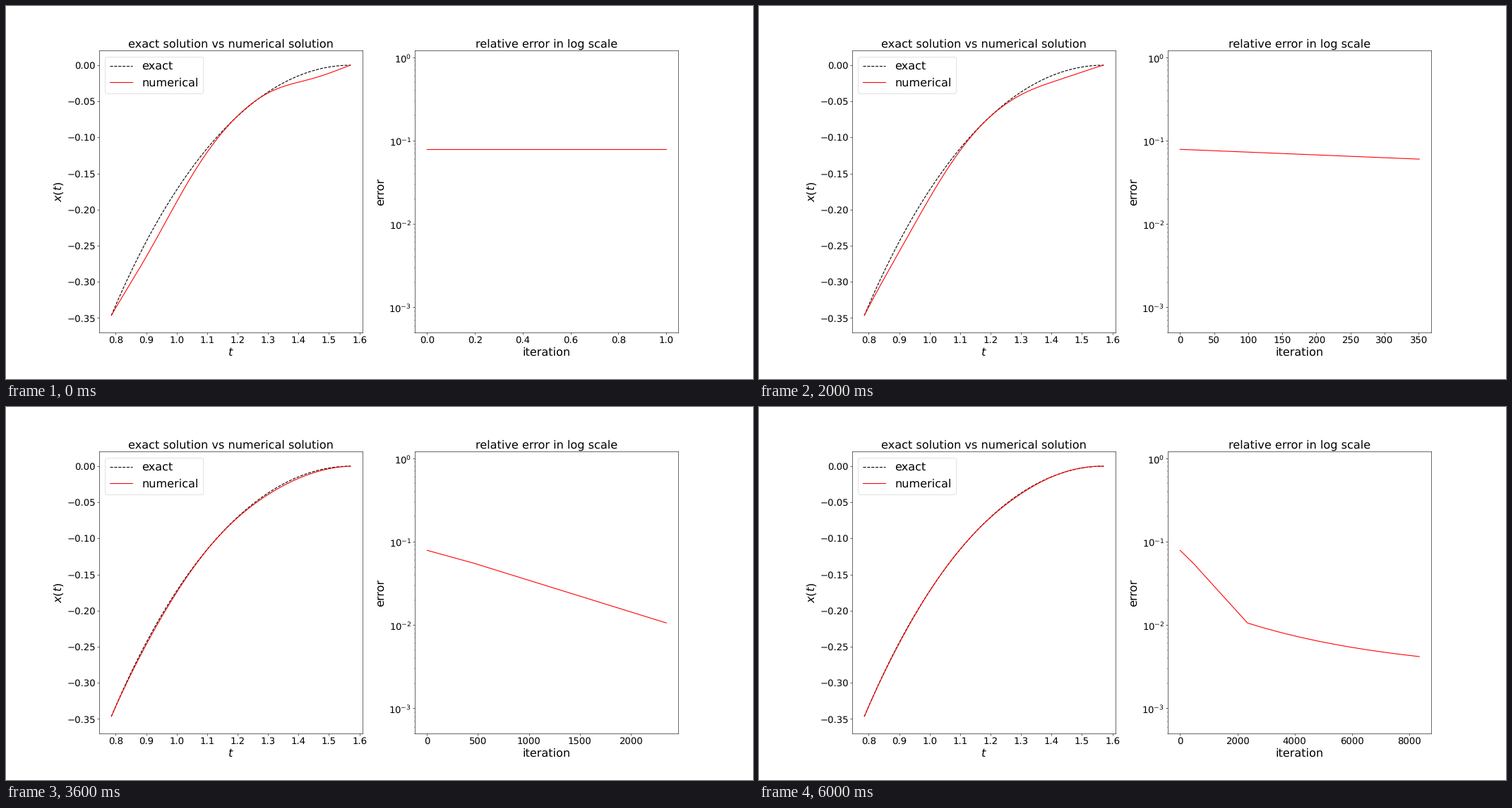
Animation of 1058x529 px, one loop 6.4 s. Source, as a matplotlib script:

```python
import math
import numpy as np
import matplotlib.pyplot as plt
from matplotlib.animation import FuncAnimation

DPI = 52.9
FRAMES = 16
LABEL, TICK = 22, 18
KINK = 2351  # convergence slows down from this iteration on
plt.rcParams.update({"font.family": "DejaVu Sans", "text.hinting": "none"})

t = np.linspace(np.pi / 4, np.pi / 2, 400)
s = (t - t[0]) / (t[-1] - t[0])
exact = np.log(np.sin(t))

# Sine modes of the deviation: (start amplitude, decay rate).
MODES = [(0.0092, 0.00066), (0.0058, 0.0028), (0.0106, 0.00087),
         (0.0006, 0), (0.0018, 0.0023)]


def stride(n):
    """Iterations between two snapshots; grows as the descent goes on."""
    limits = {50: 25, 350: 100, 550: 200, 1350: 400, math.inf: 1000}
    return next(size for limit, size in limits.items() if n < limit)


def iterations(frame):
    n = 1
    for _ in range(frame):
        n += stride(n)
    return n


def error(n):
    fast = np.minimum(n, KINK)
    late = np.maximum(n - KINK, 0)
    log_error = -1.104 - 3.35e-4 * fast - 4.4e-5 * np.maximum(fast - 440, 0)
    return 10 ** (log_error - 0.62 * (1 - np.exp(-late / 5700)))


def numerical(n):
    progress = min(n, KINK) + 0.35 * max(n - KINK, 0)
    return exact - sum(size * np.exp(-rate * progress) * np.sin(k * np.pi * s)
                       for k, (size, rate) in enumerate(MODES, 1))


def decorate(ax, title, xlabel, ylabel):
    ax.set_title(title, fontsize=LABEL)
    ax.set_xlabel(xlabel, fontsize=LABEL)
    ax.set_ylabel(ylabel, fontsize=LABEL)
    ax.tick_params(labelsize=TICK)


fig, (left, right) = plt.subplots(1, 2, figsize=(1058 / DPI, 529 / DPI), dpi=DPI)
fig.subplots_adjust(left=0.125, right=0.9, bottom=0.125, top=0.88, wspace=0.2)

left.plot(t, exact, "k--", lw=1.5, label="exact")
solution, = left.plot(t, exact, "r", lw=1.5, label="numerical")
left.set_ylim(-0.37, 0.02)
left.legend(loc="upper left", fontsize=LABEL)
decorate(left, "exact solution vs numerical solution", "$t$", "$x(t)$")

history, = right.plot([], [], "r", lw=1.5)
right.set_yscale("log")
right.set_ylim(5e-4, 1.2)
decorate(right, "relative error in log scale", "iteration", "error")


def update(frame):
    n = iterations(frame)
    steps = np.linspace(0, n, 400)
    solution.set_ydata(numerical(n))
    history.set_data(steps, error(steps))
    right.set_xlim(-0.05 * n, 1.05 * n)
    return solution, history


anim = FuncAnimation(fig, update, frames=FRAMES, interval=400, repeat=True)
plt.show()
```
